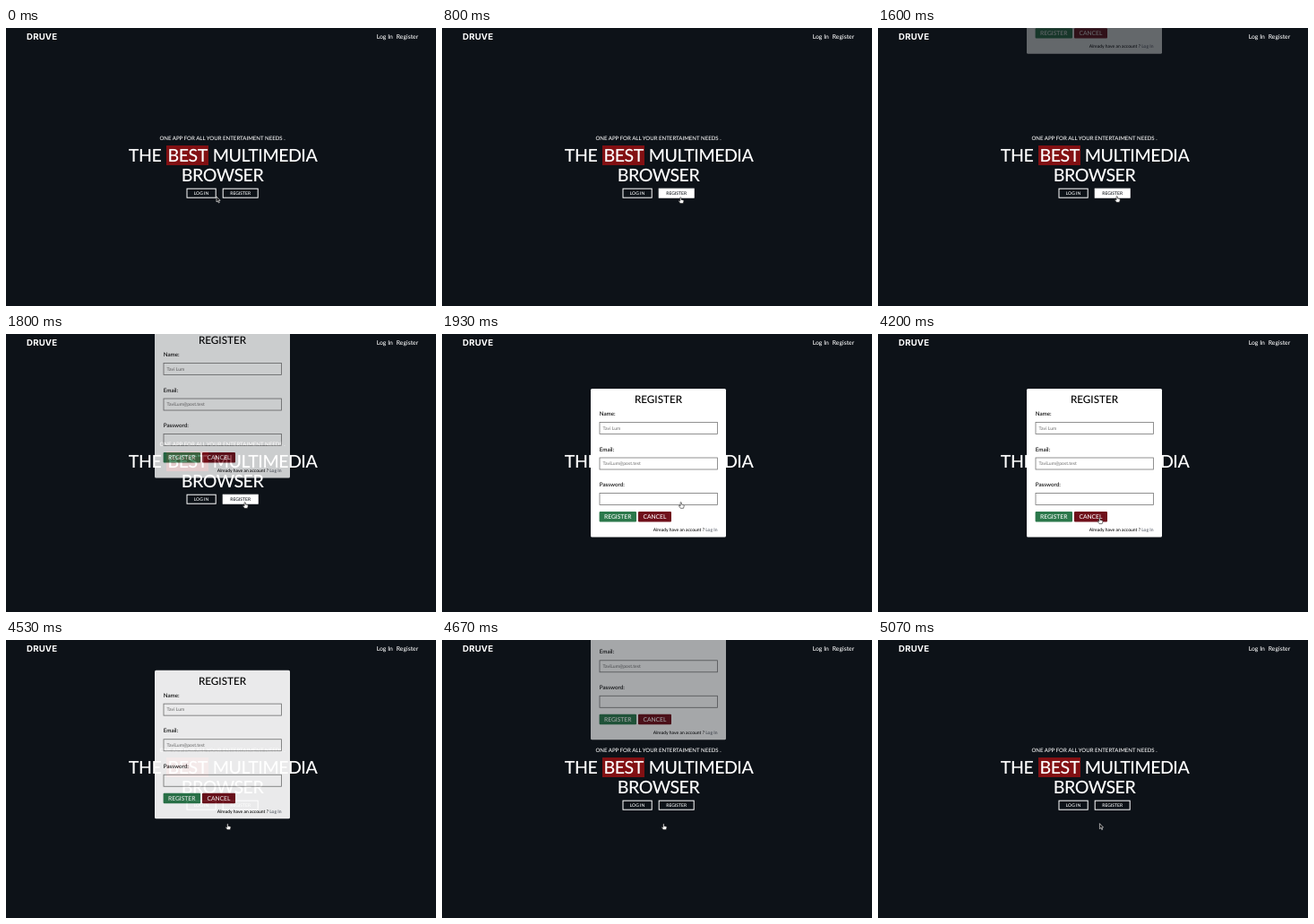
Animation of 480 by 310 pixels, one loop 5140 ms. Source, as an HTML page:

```html
<!DOCTYPE html>
<html lang="en">
<head>
<meta charset="utf-8">
<style>
  html, body { margin: 0; height: 100%; overflow: hidden; background: #0d1218; }
  svg { display: block; width: 100%; height: 100%; font-family: Lato, sans-serif; font-weight: 500; text-rendering: geometricPrecision; }
  .light { fill: #fff; }
  .mid { text-anchor: middle; }
  .brand { font: 700 9.6px Inter, sans-serif; letter-spacing: .2px; }
  .nav { font-size: 6.8px; }
  .head { font-size: 19.6px; letter-spacing: -.5px; }
  .outline { fill: none; stroke: #fff; stroke-width: 1; }
  .small { font-size: 5px; }
  .label { font-size: 6.3px; }
  .field { fill: #fff; stroke: #767676; stroke-width: .8; }
  .hint { font-size: 5.1px; fill: #777; }
  .action { font-size: 6.7px; }
  .hover rect { fill: #fff; }
  .hover text { fill: #0d1218; }
  #cursor path { stroke-linejoin: round; stroke-width: .6; }
</style>
</head>
<body>
<svg viewBox="0 0 480 310">
  <rect width="480" height="310" fill="#0d1218"/>
  <g class="light">
    <text class="brand" x="23" y="12.6">DRUVE</text>
    <g class="nav mid">
      <text x="422.8" y="12">Log In</text>
      <text x="448" y="12">Register</text>
    </g>
    <text class="mid" x="241.5" y="125.4" font-size="6.1">ONE APP FOR ALL YOUR ENTERTAIMENT NEEDS .</text>
    <rect x="179" y="131" width="47" height="22" fill="#821013"/>
    <g class="head mid">
      <text x="155" y="149">THE</text>
      <text x="202.7" y="149">BEST</text>
      <text x="289" y="149">MULTIMEDIA</text>
      <text x="241.5" y="171">BROWSER</text>
    </g>
    <g class="small mid">
      <rect class="outline" x="202" y="179.2" width="32.2" height="10"/>
      <text x="218" y="186">LOG IN</text>
      <g id="register">
        <rect class="outline" x="242.2" y="179.2" width="39" height="10"/>
        <text x="261.7" y="186">REGISTER</text>
      </g>
    </g>
  </g>

  <g id="modal">
    <rect class="light" x="166" y="61" width="151" height="165.5" rx="1.5"/>
    <text class="mid" x="241.5" y="77.4" font-size="11.7">REGISTER</text>
    <g class="label">
      <text x="175.7" y="91">Name:</text>
      <text x="175.7" y="130.5">Email:</text>
      <text x="175.7" y="170">Password:</text>
    </g>
    <g class="field">
      <rect x="176" y="98.4" width="131.4" height="13"/>
      <rect x="176" y="138" width="131.4" height="13"/>
      <rect x="176" y="177.5" width="131.4" height="13"/>
    </g>
    <g class="hint">
      <text x="179.6" y="106.7">Tavi Lum</text>
      <text x="179.6" y="146.2">TaviLum@post.test</text>
    </g>
    <rect x="175.6" y="198" width="41.4" height="11.4" rx="1" fill="#2b784b"/>
    <rect x="219" y="198" width="37" height="11.4" rx="1" fill="#70101b"/>
    <g class="action light mid">
      <text x="196.2" y="206.2">REGISTER</text>
      <text x="237.4" y="206.2">CANCEL</text>
    </g>
    <text class="small" x="307.5" y="219.8" text-anchor="end">Already have an account ? <tspan fill="#555b66">Log In</tspan></text>
  </g>

  <g id="cursor">
    <path id="arrow" d="M0 0V6L1.4 4.8 2.4 7 3.3 6.6 2.3 4.5 4.1 4.4Z" fill="#111" stroke="#fff"/>
    <path id="hand" d="M-.6 .6Q0-.4 .6 .6V2.8L3 3.3Q3.7 3.5 3.5 4.6L2.8 7H-.4L-2.2 4.6Q-2.3 3.6-1.4 3.9L-.6 4.6Z" fill="#fff" stroke="#222"/>
    <path id="beam" d="M-1.2-3Q0-3 0-2.3Q0-3 1.2-3M0-2.3V2.3M-1.2 3Q0 3 0 2.3Q0 3 1.2 3" fill="none" stroke="#111"/>
  </g>
</svg>
<script>
const LOOP = 5140, FPS = 15, TRAVEL = 310, SLIDE = 470;
const OPEN = 1430, CLOSE = 4492;
const el = id => document.getElementById(id);
const clamp = v => Math.min(1, Math.max(0, v));

// Pointer positions: time, x, y
const path = [
  [200, 235, 188], [330, 239, 200], [470, 250, 212], [600, 260, 204],
  [730, 266, 190], [867, 266.7, 187.3], [2800, 266.7, 187.3],
  [2866, 262, 192], [3070, 253, 209], [3267, 247.4, 204.6]
];

function pointerAt(t) {
  const next = path.findIndex(p => p[0] > t);
  if (next < 0) return path.at(-1).slice(1);
  if (next === 0) return path[0].slice(1);
  const [a, b] = [path[next - 1], path[next]];
  const k = (t - a[0]) / (b[0] - a[0]);
  return [a[1] + (b[1] - a[1]) * k, a[2] + (b[2] - a[2]) * k];
}

function shapeAt(t) {
  if (t < 790 || t >= 5060) return 'arrow';
  return t >= 2860 && t < 3000 ? 'beam' : 'hand';
}

function draw(t) {
  const shown = clamp((t - OPEN) / SLIDE) - clamp((t - CLOSE) / SLIDE);
  el('modal').setAttribute('transform', `translate(0 ${(shown - 1) * TRAVEL})`);
  el('modal').setAttribute('opacity', shown);
  el('register').classList.toggle('hover', t >= 790 && t < 2500);
  el('cursor').setAttribute('transform', `translate(${pointerAt(t)})`);
  for (const id of ['arrow', 'hand', 'beam'])
    el(id).style.display = id === shapeAt(t) ? '' : 'none';
}

// Fixed frame rate; the small lead absorbs rounding of frame times to 10 ms
function tick() {
  const t = performance.now() % LOOP;
  draw(Math.floor((t + 5) * FPS / 1000) * 1000 / FPS);
  requestAnimationFrame(tick);
}
tick();
</script>
</body>
</html>
```
